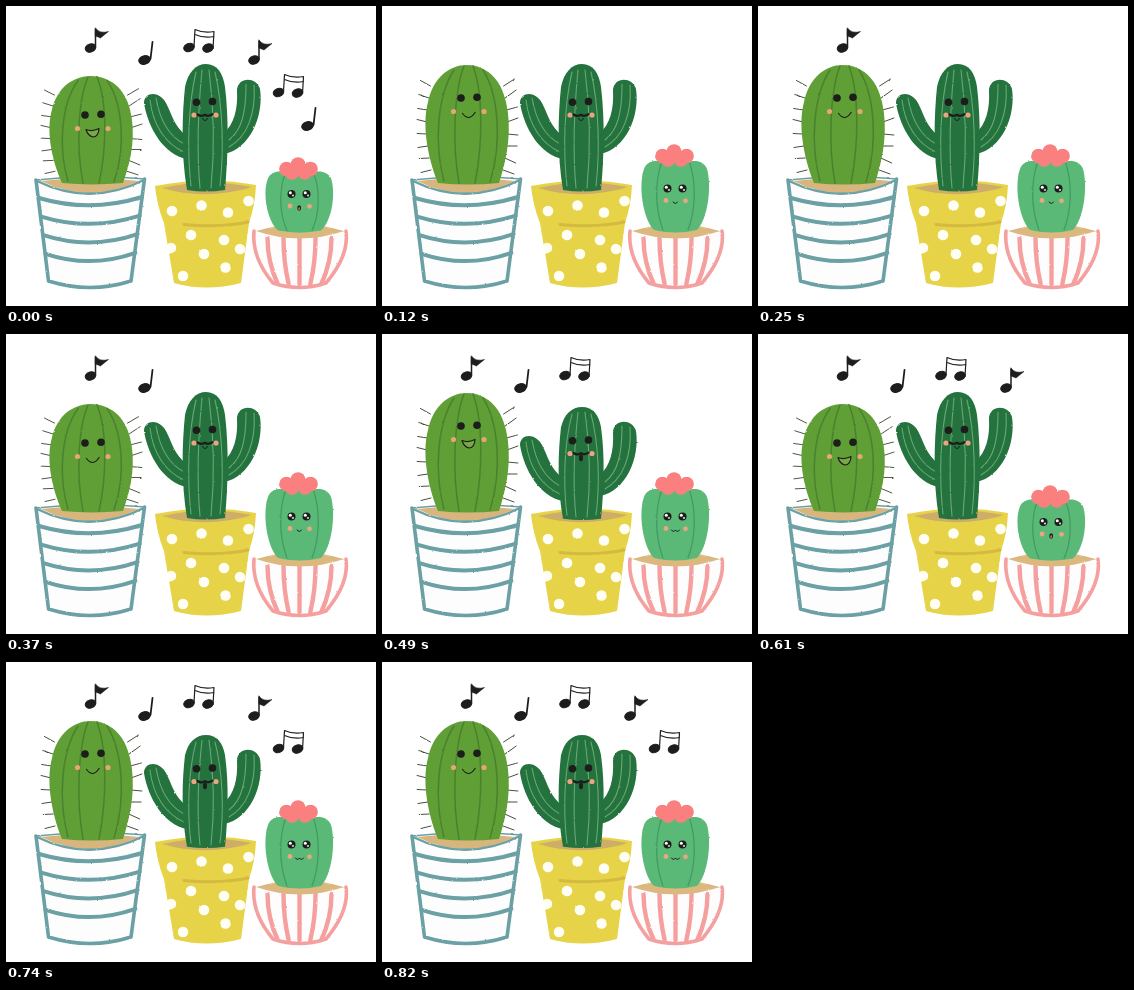
These frames come from a looping animation (370 px wide and 300 px high, 0.87 s). An HTML page:

```html
<!DOCTYPE html>
<html lang="en">
<head>
<meta charset="utf-8">
<title>Singing cacti</title>
<style>
html, body { margin: 0; width: 100%; height: 100%; overflow: hidden; background: #fff }
svg { display: block; width: 370px; height: 300px; fill: none; stroke-linecap: round; stroke-linejoin: round }
</style>
</head>
<body>
<svg viewBox="0 0 370 300">
  <defs>
    <filter id="crayon" filterUnits="userSpaceOnUse" x="0" y="0" width="370" height="300" color-interpolation-filters="sRGB">
      <feTurbulence type="fractalNoise" baseFrequency=".3" numOctaves="2" seed="4"/>
      <feDisplacementMap in="SourceGraphic" scale="1.8" xChannelSelector="R" yChannelSelector="G"/>
    </filter>
  </defs>
  <g filter="url(#crayon)">
    <g id="pots"></g>
    <g id="plants"></g>
  </g>
  <g id="faces"></g>
  <g id="notes" fill="#1d1d1b" stroke="#1d1d1b"></g>
</svg>
<script>
const $ = id => document.getElementById(id);
const line = (d, color, width = 1) => `<path d="${d}" stroke="${color}" stroke-width="${width}"/>`;
const shape = (d, color) => `<path d="${d}" fill="${color}"/>`;
const oval = (x, y, rx, ry, color) => `<ellipse cx="${x}" cy="${y}" rx="${rx}" ry="${ry}" fill="${color}"/>`;
const dots = (points, r, color) => points.map(([x, y]) => oval(x, y, r, r, color)).join('');
const move = (y, body, sy = 1) => `<g transform="translate(0 ${y}) scale(1 ${sy})">${body}</g>`;
const INK = '#1d1d1b', BLUSH = '#e5a673';

function stripedPot() {
  const teal = '#6ba0a4';
  let s = shape('M30 174 Q84 170 139 173 L126 277 Q84 288 43 277Z', '#fdfdfd')
    + shape('M35 175 Q84 169 133 175 Q84 199 35 175Z', '#d9b57e')
    + line('M30 174 Q84 168 139 173', teal, 1.6)
    + line('M31 175 Q84 201 138 174', teal, 2.4)
    + line('M30 174 L42.5 275 Q84 288 125 275 L138.5 173', teal, 3.6);
  for (let i = 0; i < 4; i++) {
    const y = 192 + i * 18.6, inset = i * 2.2;
    s += line(`M${33 + inset} ${y} Q84 ${y + 15} ${136 - inset} ${y - 1}`, teal, 4);
  }
  return s;
}

function dottedPot() {
  return shape('M149 180 Q200 170 250 179 Q249 200 243 217 L235 277 Q200 286 168 277 L158 217 Q151 200 149 180Z', '#e6d348')
    + shape('M156 182 Q200 172 246 181 Q200 195 156 182Z', '#cdad68')
    + line('M178 218.5 Q214 222 242 216', '#d4bb40', 3)
    + dots([[166, 205], [195.5, 199.5], [222, 206.5], [242.5, 195], [185, 229], [218, 234],
            [165, 242], [198, 248], [234, 243], [177, 270], [219.5, 261.5]], 5.3, '#fffef5');
}

function bowl() {
  const pink = '#f5a09f', sides = 'M248 225 C246 246 256 264 267 277 Q293 286 320 277 C331 264 343 246 340 225';
  let s = shape(sides + 'Z', '#fdfdfd');
  for (let x = -32; x <= 32; x += 16)
    s += line(`M${293.5 + x} 232 Q${293.5 + x} 256 ${293.5 + x * .68} 278`, pink, 4.4);
  return s + line(sides, pink, 3.6) + shape('M250 225 Q294 212 338 225 Q294 240 250 225Z', '#dcb87f');
}

function roundCactus() {
  let spines = '';
  for (let i = 0; i < 8; i++) {
    const y = 80 + i * 12, bulge = 5 * Math.sin((y - 70) / 32), tip = i * 2 - 7;
    spines += `M${50 - bulge} ${y} l-10 ${tip / 2 + i % 3 - 2} M${120 + bulge} ${y} l11 ${tip - i % 2 * 3}`;
  }
  return line(spines, '#47503a')
    + shape('M56 177 C45 150 40 118 46 96 C51 72 67 59 85 59 C103 59 119 72 124 96 C130 122 126 150 117 177 Q86 180 56 177Z', '#609f36')
    + line('M62 175 C52 138 55 90 72 64 M77 177 C70 138 72 86 82 60 M93 177 C101 138 101 86 91 60 M108 176 C120 138 117 89 101 64', '#4a812e', 1.5);
}

const arms = () => shape('M138 97 C138 86 153 84 160 97 C166 108 168 121 181 130 L181 153 C158 149 142 122 138 97Z', '#24723e')
  + shape('M231 85 C231 71 250 70 254 83 C258 110 244 143 218 148 L218 127 C228 118 232 103 231 85Z', '#24723e')
  + line('M144 94 C147 120 160 138 178 146 M150 92 C154 115 163 130 178 138 M240 78 C240 106 236 124 223 134 M248 79 C250 108 241 131 223 141', '#69a773', 1.1);

const trunk = () => shape('M181 184 C175 149 176 110 179 81 C182 66 190 58 200 58 C211 58 217 67 219 81 C223 114 222 150 219 184 Q200 187 181 184Z', '#24723e')
  + line('M185 180 C181 145 182 100 190 66 M194 182 C190 140 193 95 196 64 M205 182 C209 140 207 95 203 64 M214 180 C218 145 217 100 209 66', '#69a773', 1.1);

function smallCactus(short) {
  const body = shape('M272 224 C261 213 256 180 262 163 C265 155 274 153 281 157 C288 153 299 153 305 157 C312 153 322 155 325 163 C330 180 326 213 315 224 Q294 229 272 224Z', '#5bb978')
    + line('M279 158 C273 177 273 203 281 224 M308 158 C314 177 314 203 306 224', '#429b61', 1.3);
  const flower = dots([[292, 145.5], [280.5, 150], [304.5, 150], [286, 153.5], [299, 153.5]], 7.3, '#f9807f');
  return (short ? move(33, body, .855) : body) + move(short ? 13 : 0, flower);
}

const eyes = (x1, x2, y) => dots([[x1, y], [x2, y - .7]], 3.8, INK);

function roundFace(short, open) {
  const mouth = open
    ? `<path d="M80 106.5 Q86 109 93 105.5 Q92.5 114 87 114 Q82 113 80 106.5Z" fill="#79a946" stroke="${INK}" stroke-width="1.2"/>`
    : line('M80.5 107.5 Q87 116 93 106.5', INK, 1.2);
  return move(short ? 17 : 0, eyes(79, 95, 92) + dots([[71.5, 105.5], [102, 105.5]], 2.6, BLUSH) + mouth);
}

function armedFace(short) {
  const mouth = short ? oval(199, 113.5, 2, 3.2, INK) : line('M196.5 112.5 Q199 117 201.5 112.5', INK);
  return move(short ? 10.5 : 0, eyes(190.5, 206.5, 96.2) + dots([[188, 109], [210, 109]], 2.6, '#eba680')
    + mouth + line('M191.5 108.5 Q195 111 199 108.7 Q203 111 206.5 108.2', INK, 2.2));
}

function smallFace(short, wavy) {
  const pupils = dots([[285.5, 182.5], [300.5, 182.5]], 4, INK) + dots([[284.3, 181.3], [299.3, 181.3]], 1.5, '#fff')
    + dots([[287, 184], [302, 184]], .9, '#fff');
  const mouth = short ? oval(293.2, 196.5, 1.9, 2.7, INK) + oval(293.2, 197, .9, 1.5, '#d5605d')
    : line(wavy ? 'M289.5 196 Q291.5 199 293.5 196 Q295.5 199 297.5 196' : 'M291 196 Q293.5 199 295.5 196', INK);
  return move(short ? 5.5 : 0, pupils + dots([[284, 194.5], [303.5, 194.8]], 2.4, '#eba680') + mouth);
}

const head = (x, y) => `<ellipse rx="5.4" ry="4.1" transform="translate(${x} ${y}) rotate(-18)"/>`;
const single = (x, y) => head(x, y) + head(x + 1, y) + line(`M${x + 6.5} ${y - 1} L${x + 8.5} ${y - 18}`, INK, 1.8);
const flagged = (x, y) => head(x, y) + line(`M${x + 5} ${y - 1} V${y - 19}`, INK, 1.5)
  + `<path stroke-width=".5" d="M${x + 5} ${y - 20} Q${x + 9} ${y - 14} ${x + 18} ${y - 16.5} L${x + 10} ${y - 10} L${x + 5} ${y - 12}Z"/>`;
const beamed = (x, y) => head(x, y) + head(x + 19, y + .5)
  + `<path fill="none" stroke-width="1.2" d="M${x + 5} ${y - 1} l1 -17 q9 4 19 2 l-1 17 M${x + 6} ${y - 13} q9 4 19 2"/>`;
const notes = [flagged(84.5, 42), single(138, 54), beamed(183, 41.5), flagged(248, 54), beamed(272.5, 86.5), single(301, 120)];

// Each pose: start ms, round [short, open], armed short, small [short, wavy], visible notes
const poses = [
  [0, [1, 1], 0, [1, 0], 6],
  [120, [0, 0], 0, [0, 0], 0],
  [250, [0, 0], 0, [0, 0], 1],
  [370, [1, 0], 0, [0, 0], 2],
  [490, [0, 1], 1, [0, 1], 3],
  [610, [1, 1], 0, [1, 0], 4],
  [740, [0, 0], 1, [0, 1], 5],
];

function draw([, round, armed, small, count]) {
  $('plants').innerHTML = move(round[0] ? 16.5 : 0, roundCactus(), round[0] ? .907 : 1)
    + move(armed ? 14 : 0, arms()) + move(armed ? 21.5 : 0, trunk(), armed ? .887 : 1) + smallCactus(small[0]);
  $('faces').innerHTML = roundFace(...round) + armedFace(armed) + smallFace(...small);
  $('notes').innerHTML = notes.slice(0, count).join('');
}

$('pots').innerHTML = stripedPot() + dottedPot() + bowl();
const start = performance.now();
let shown;
function tick() {
  const t = (performance.now() - start) % 870;
  const pose = poses.findLast(p => p[0] <= t);
  if (pose !== shown) draw(shown = pose);
  requestAnimationFrame(tick);
}
tick();
</script>
</body>
</html>
```
